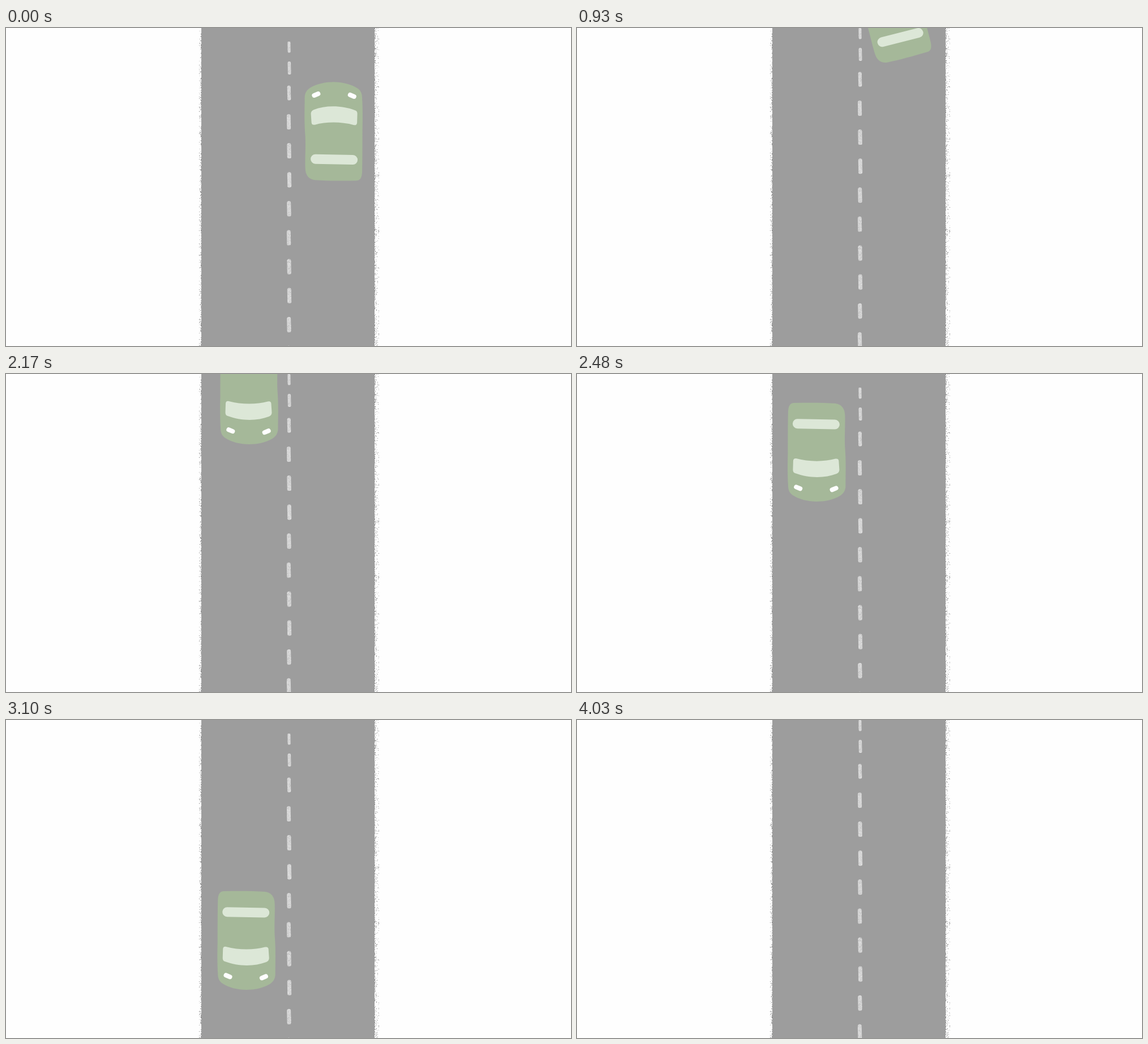
These frames come from a looping animation (998x561 px, 4.34 s). An HTML page with a canvas:

```html
<!DOCTYPE html>
<html lang="en">
<head>
<meta charset="utf-8">
<title>U-turn</title>
<style>
  html, body { margin: 0; width: 100%; height: 100%; overflow: hidden; background: #fefefe; }
  canvas { display: block; width: 998px; height: 561px; }
</style>
</head>
<body>
<canvas id="stage" width="998" height="561"></canvas>
<script>
const W = 998, H = 561, STEP = 310, STEPS = 14, SHIFT = 24;
const ROAD_LEFT = 345, ROAD_RIGHT = 651;
const ctx = document.getElementById('stage').getContext('2d');

// Points the car passes, two steps apart, joined by a smooth curve
const route = [
  [576, 239], [578.5, 108], [557, -31], [491, -45],
  [429.5, 37], [425, 261.5], [425, 522], [425, 790]
];

const clamp = (v, lo, hi) => Math.min(hi, Math.max(lo, v));

function smooth(from, to, v) {
  const u = clamp((v - from) / (to - from), 0, 1);
  return u * u * (3 - 2 * u);
}

function spline(points, f, axis) {
  const i = Math.floor(f), u = f - i;
  const [a, b, c, d] = [-1, 0, 1, 2].map(k => points[clamp(i + k, 0, points.length - 1)][axis]);
  return b + u / 2 * (c - a + u * (2 * a - 5 * b + 4 * c - d + u * (3 * (b - c) + d - a)));
}

function makeRandom(seed) {
  return () => (seed = (seed * 16807) % 2147483647) / 2147483647;
}

function layer(draw) {
  const c = document.createElement('canvas');
  c.width = W;
  c.height = H;
  draw(c.getContext('2d'), makeRandom(4721));
  return c;
}

const road = layer((g, rnd) => {
  g.fillStyle = '#fefefe';
  g.fillRect(0, 0, W, H);
  g.fillStyle = '#9d9d9d';
  g.fillRect(ROAD_LEFT, 0, ROAD_RIGHT - ROAD_LEFT, H);
  const grain = (edge, dir, reach, count) => {
    for (let i = 0; i < count; i++) {
      const d = Math.floor(rnd() ** 2.3 * reach);
      const shade = Math.floor(115 + rnd() * 115);
      g.fillStyle = `rgb(${shade},${shade},${shade})`;
      g.fillRect(edge + dir * d, Math.floor(rnd() * H), 1, 1);
    }
  };
  grain(ROAD_LEFT - 1, -1, 4, 520);
  grain(ROAD_RIGHT, 1, 8, 800);
});

// Chalk dashes: short and close at the top, then evenly spaced
const marks = layer((g, rnd) => {
  for (let i = 0, y = 9.5; y < H; y += Math.min(51.1, 37 + 7 * i++)) {
    const x = 500 + 0.5 * Math.sin(i * 1.6);
    const w = Math.min(7, 5 + i * 0.6), h = Math.min(27, 20 + 3 * i);
    g.save();
    g.translate(x, y);
    g.rotate(-0.02);
    g.beginPath();
    g.roundRect(-w / 2, -h / 2, w, h, [w / 2, w / 2, w / 3, w / 3]);
    g.fillStyle = '#d6d6d6';
    g.fill();
    g.clip();
    for (let n = w * h * 0.3; n > 0; n--) {
      g.fillStyle = rnd() < 0.6 ? '#bfbfbf' : '#e4e4e4';
      g.fillRect(Math.floor((rnd() - 0.5) * w), Math.floor((rnd() - 0.5) * h), 1, 1);
    }
    g.restore();
  }
});

const body = new Path2D(`M-51-59 C-51-68-47-73-41-77 C-29-84-14-87 0-87
  C16-87 31-83 42-76 C48-72 50.5-67 50.5-58 C51.5-42 51.5-20 51-2
  C51 25 51 50 50.5 71 C50 82 47 87 40 87 C13 87.5-13 87.5-33 86
  C-43 85-50 78-50 64 C-50.5 45-49 28-50 8 C-52-17-51-39-51-59Z`);

const windscreen = new Path2D(`M-40-31 Q-40-36-35-38 C-14-46 14-46 38-37
  Q42-36 42-31 L41.5-15 Q41-10 36-11 C14-17-13-17-33-11.5
  Q-39-10.5-39-16Z`);

function bar(x, y, length, width, slope, color) {
  ctx.strokeStyle = color;
  ctx.lineWidth = width;
  ctx.lineCap = 'round';
  ctx.beginPath();
  ctx.moveTo(x - length / 2, y - slope * length / 2);
  ctx.lineTo(x + length / 2, y + slope * length / 2);
  ctx.stroke();
}

function drawCar(step) {
  const f = (step + 1) / 2;
  ctx.save();
  ctx.translate(spline(route, f, 0), spline(route, f, 1));
  ctx.rotate(-Math.PI * smooth(2.2, 6.65, step));
  ctx.fillStyle = '#a5b899';
  ctx.fill(body);
  ctx.fillStyle = '#dce7d7';
  ctx.fill(windscreen);
  bar(1, 49.7, 66, 17, 0.02, '#dce7d7');
  bar(-30.7, -64.7, 7, 8, -0.42, '#fefefe');
  bar(32.7, -62.7, 7, 8, 0.42, '#fefefe');
  ctx.restore();
}

function frame(now) {
  const step = Math.floor(now / STEP) % STEPS;
  ctx.drawImage(road, 0, 0);
  ctx.drawImage(marks, 0, step % 2 ? 0 : SHIFT);
  drawCar(step);
}

let start;
function tick(now) {
  if (start === undefined) start = now;
  frame(Math.max(0, now - start));
  requestAnimationFrame(tick);
}
frame(0);
requestAnimationFrame(tick);
</script>
</body>
</html>
```
